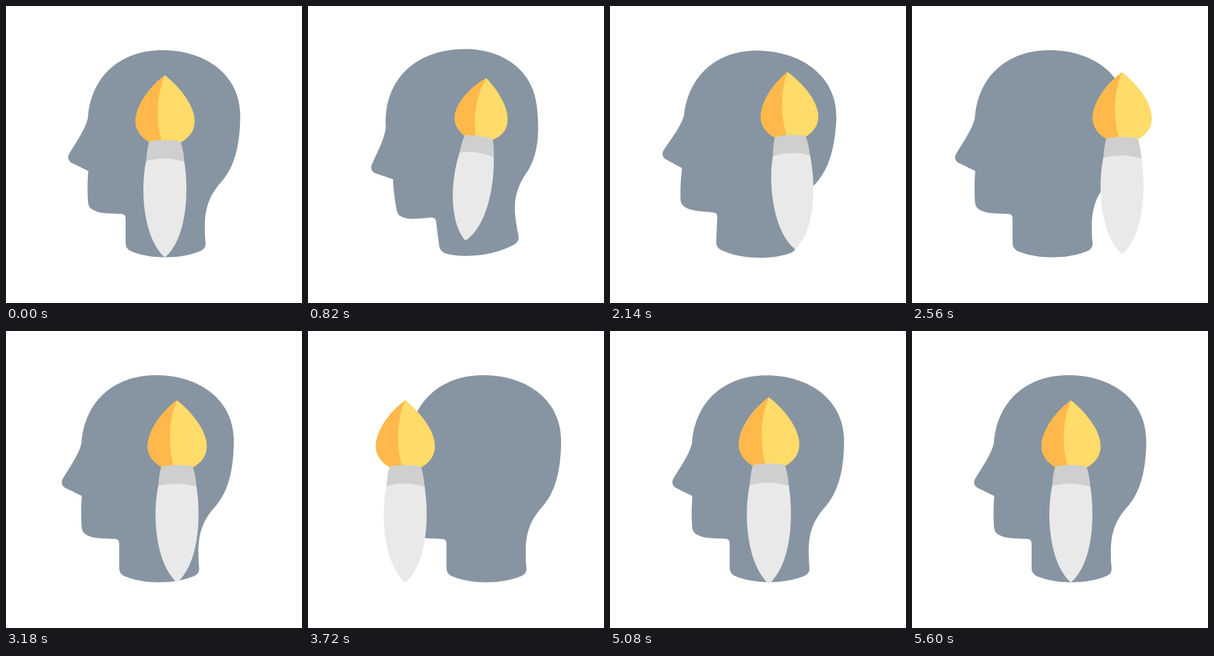
An HTML page that plays this animation: 448 by 450 pixels, repeating every 5.62 s.

```html
<!DOCTYPE html>
<html lang="en">
<head>
<meta charset="utf-8">
<title>Creative mind</title>
<style>
html, body { margin: 0; width: 100%; height: 100%; overflow: hidden; background: #fff; }
svg { display: block; width: 448px; height: 450px; }
</style>
</head>
<body>
<svg viewBox="0 0 448 450">
  <path id="head" fill="#8795a2" d="M237 67C305 67 354.500 107 354.500 165C354.500 205 348 240 328 264C309 285 300 304 301 340Q301 350 302 359C302.500 365 300 368 295 371C265 384 217 384 188 371Q181 367 181 359V322Q181 315 174 315C155 314 141 315 130 308Q124 304 124 295C123 275 123.500 265 124.500 250L98 237Q92 232 95 225C105 208 121 186 124 169C129 107 172 67 237 67Z"/>
  <g id="brush">
    <path fill="#ffdb69" d="M240.500 105C222 118 196 148 196 175C196 189 206 201 220 208H262C276 201 285.500 190 285.500 175C285.500 150 262 122 240.500 105Z"/>
    <path fill="#ffb84c" d="M240.500 105C222 118 196 148 196 175C196 189 206 201 220 208H236.500C226 172 228 135 240.500 105Z"/>
    <path fill="#cfcfcf" d="M212 237Q213 219 216 208Q217 205 220 204.500Q241 201.500 261 204.500Q264 205 265 208Q269 221 270 237Z"/>
    <path fill="#e9e9e9" d="M212 235Q241 227 270 236C278 290 271 355 240.500 381C210 355 202 285 212 235Z"/>
  </g>
</svg>
<script>
const STEP = 20, STEPS = 281;
const head = document.getElementById('head');
const brush = document.getElementById('brush');

// Linear rise from 0 at start to 1 at peak, then fall to 0 at end
const tent = (t, start, peak, end) =>
  Math.max(0, Math.min((t - start) / (peak - start), (end - t) / (end - peak)));

function place(el, px, py, x, y, turn, scale) {
  el.setAttribute('transform',
    `translate(${px + x} ${py + y}) rotate(${turn}) scale(${scale}) translate(${-px} ${-py})`);
}

function draw() {
  const t = Math.floor(performance.now() / STEP) % STEPS;

  // Head and brush tilt in opposite directions
  const back = tent(t, 0, 34, 86), nod = tent(t, 34, 86, 114);
  const turn = 10 * (nod - back);
  // They slide apart, then swap sides
  const apart = tent(t, 86, 148, 176), swap = tent(t, 148, 176, 209);
  const settle = tent(t, 34, 86, 148);
  // One grows while the other shrinks, then the reverse
  const swell = tent(t, 209, 237, 265), pinch = tent(t, 237, 265, 280);

  place(head, 224, 224, 41 * swap - 42.5 * apart, 0,
    turn, 1 + 0.15 * swell - 0.1 * pinch);
  place(brush, 240.5, 292, 10 * back - 5.5 * settle + 117 * apart - 134 * swap,
    -16 * back - 15 * settle,
    -turn, 1 - 0.1 * (back + nod) - 0.4 * swell + 0.3 * pinch);

  requestAnimationFrame(draw);
}
draw();
</script>
</body>
</html>
```
